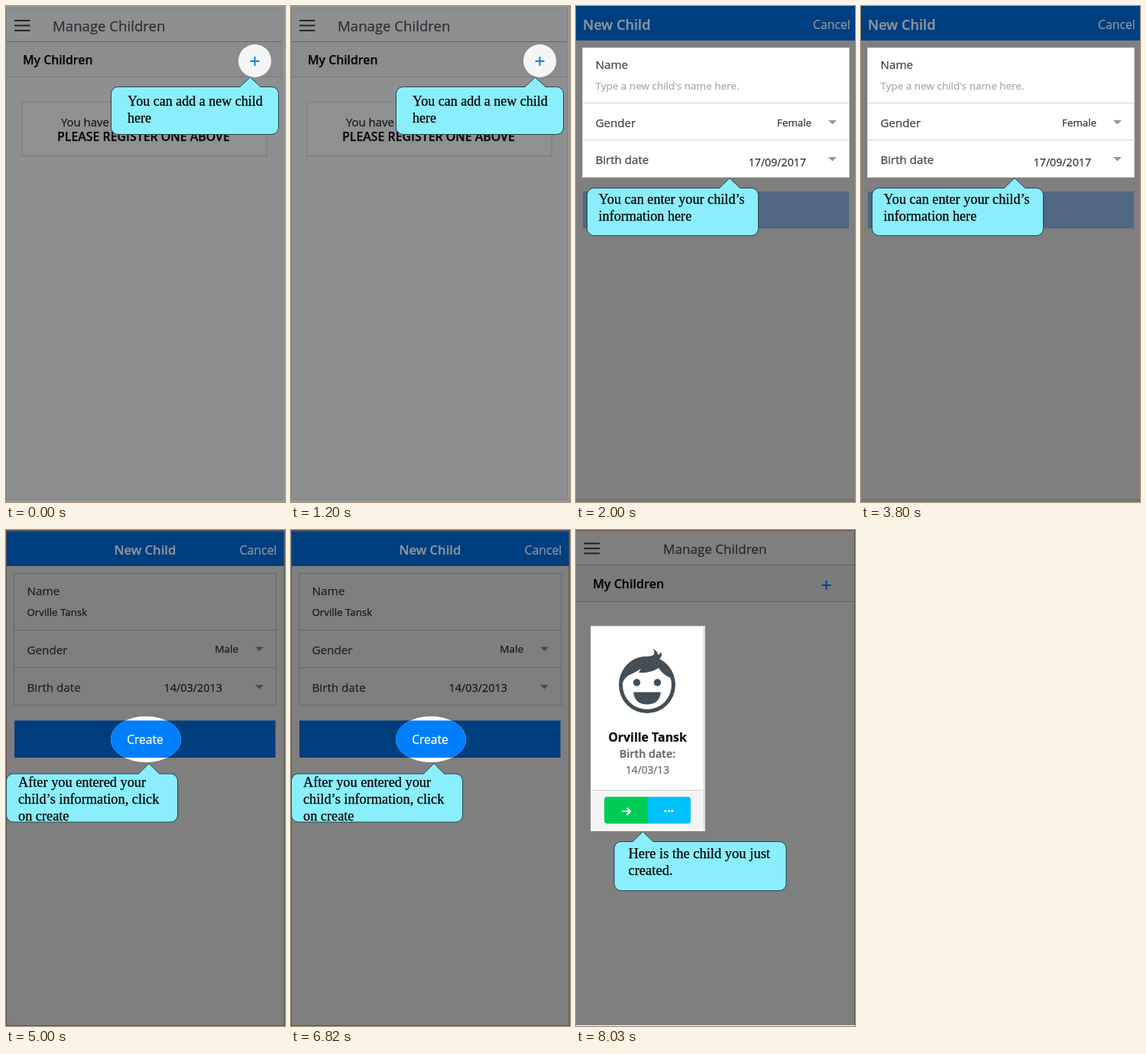
An HTML page for the animation above (10 s loop, 365 by 647 pixels).

```html
<!DOCTYPE html>
<html lang="en">
<head>
<meta charset="utf-8">
<title>Adding a child</title>
<style>
html, body { margin: 0; width: 100%; height: 100%; overflow: hidden; background: #7f7f7f; }
svg { display: block; width: 365px; height: 647px; font-family: "Open Sans", "Noto Sans", sans-serif; }
text { stroke-width: .25px; }
.tip text { font-family: "Liberation Serif", serif; }
</style>
</head>
<body>
<svg id="stage" viewBox="0 0 365 647"></svg>
<script>
const stage = document.getElementById("stage");

const rect = (x, y, w, h, fill, extra = "") =>
  `<rect x="${x}" y="${y}" width="${w}" height="${h}" fill="${fill}" ${extra}/>`;

// The thin stroke gives the letters a slightly stronger weight
const text = (x, y, size, fill, str, weight = 400, anchor = "start") =>
  `<text x="${x}" y="${y}" font-size="${size}" fill="${fill}" stroke="${fill}" font-weight="${weight}" text-anchor="${anchor}">${str}</text>`;

const path = (d, fill, stroke = "none", width = 1) =>
  `<path d="${d}" fill="${fill}" stroke="${stroke}" stroke-width="${width}"/>`;

const circle = (x, y, r, fill) => `<circle cx="${x}" cy="${y}" r="${r}" fill="${fill}"/>`;

const arrow = (x, y, fill) => path(`M${x} ${y}h11l-5.5 5.5z`, fill);
const plus = (x, y, color) => path(`M${x - 6} ${y}h12M${x} ${y - 6}v12`, "none", color, 2);
const menu = (x, y, color) => path(`M${x} ${y}h20.5m-20.5 6.5h20.5m-20.5 6.5h20.5`, "none", color, 2);

// Speech bubble whose tail points up to (tipX, tipY)
function bubble(x, y, w, h, tipX, tipY, textX, textY, size, lines) {
  const r = 9, half = 13.5, arc = (dx, dy) => `a${r} ${r} 0 0 1 ${dx} ${dy}`;
  const d = `M${x + r} ${y}H${tipX - half}L${tipX} ${tipY}L${tipX + half} ${y}H${x + w - r}` +
    `${arc(r, r)}V${y + h - r}${arc(-r, r)}H${x + r}${arc(-r, -r)}V${y + r}${arc(r, -r)}z`;
  return `<g class="tip">${path(d, "#8aeefd", "#23474d")}` +
    lines.map((s, i) => text(textX, textY + i * 22, size, "#000", s)).join("") + "</g>";
}

const NAME = "Orville Tansk";
const EDGE = "#5d4c48";

const emptyList = () =>
  rect(0, 0, 365, 647, "#949597") +
  rect(.5, 2.5, 361, 641, "#8e8f91", 'stroke="#7f8082"') +
  rect(1, 47, 360, 45, "#8b8c8e") +
  path("M0 46.5H361", "none", "#68696b") +
  path("M0 92.5H361", "none", "#7b7c7e") +
  menu(11, 19, "#27282a") +
  text(61, 33, 18.6, "#303134", "Manage Children") +
  text(22, 76, 15.8, "#080808", "My Children", 600) +
  rect(20, 125, 322, 72, "#818284", 'rx="2"') +
  rect(21, 125, 320, 70, "#8f9092", 'rx="2" stroke="#7d7e80"') +
  text(72, 157, 14.9, "#18191a", "You have") +
  text(67, 176, 15.9, "#080808", "PLEASE REGISTER ONE ABOVE", 600) +
  circle(325.5, 71.5, 21.5, "#f5f5f6") +
  plus(325.5, 72, "#0a80f5") +
  bubble(137.5, 105.5, 219, 62, 319.5, 93, 159, 130, 18, ["You can add a new child", "here"]);

const emptyForm = () =>
  rect(0, 0, 365, 647, "#7f7f7f") +
  rect(0, 0, 365, 45, "#003f80") +
  rect(0, 643, 365, 4, "#757575") +
  text(9, 31, 18.2, "#8c959e", "New Child", 600) +
  text(310, 30, 15.8, "#8c959e", "Cancel") +
  rect(8.5, 54.5, 349, 169, "#fff", 'stroke="#d0d0d0"') +
  path("M9 126.5H357M9 175H357", "none", "#dcdcdc", 1.5) +
  text(25.5, 82, 15.2, "#444", "Name") +
  text(25.5, 109, 13.5, "#aaa", "Type a new child's name here.") +
  text(25.5, 158, 15.1, "#444", "Gender") +
  text(25.5, 206, 15.1, "#444", "Birth date") +
  text(308, 157, 13.3, "#333", "Female", 400, "end") +
  text(301, 209, 14.2, "#333", "17/09/2017", 400, "end") +
  arrow(330, 149, "#999") + arrow(330, 197, "#999") +
  rect(9, 242, 348, 48, "#516683") +
  bubble(14.5, 237.5, 224, 62, 201, 224.5, 29.5, 258, 18.2, ["You can enter your child’s", "information here"]);

const filledForm = () =>
  rect(0, 0, 365, 647, "#7f7f7f") +
  rect(0, 1.5, 364, 45.5, "#003f7f") +
  rect(.5, .5, 363.5, 646, "none", `stroke="${EDGE}"`) +
  text(141.5, 32, 16.6, "#8c959e", "New Child", 600) +
  text(305.5, 32, 15.8, "#8c959e", "Cancel") +
  rect(10.5, 56.5, 343, 172, "none", 'stroke="#686868"') +
  path("M11 130.5H353M11 179.5H353", "none", "#686868") +
  text(27.5, 85, 15.3, "#222", "Name") +
  text(27.5, 112, 13.3, "#191919", NAME) +
  text(27.5, 162, 15.2, "#222", "Gender") +
  text(27.5, 211, 15.2, "#222", "Birth date") +
  text(304, 160, 13.5, "#191919", "Male", 400, "end") +
  text(283, 211, 14.4, "#191919", "14/03/2013", 400, "end") +
  arrow(326, 152.5, "#4a4a4a") + arrow(326, 202, "#4a4a4a") +
  rect(11, 248.5, 341.5, 48.5, "#003e7d") +
  '<clipPath id="spot"><ellipse cx="183" cy="273" rx="46" ry="30"/></clipPath>' +
  `<g clip-path="url(#spot)">${rect(137, 243, 92, 60, "#fff")}${rect(137, 248.5, 92, 48.5, "#007ffc")}</g>` +
  text(182, 279, 15.6, "#fff", "Create", 400, "middle") +
  bubble(.5, 318, 224, 63, 187, 304.5, 16, 335, 18.3,
    ["After you entered your", "child’s information, click", "on create"]);

const face = ink =>
  circle(93, 202, 37, ink) + circle(93, 202, 32, "#fff") +
  path("M57 199C58 180 73 165 91 165C97 165 101 164 102 162Q103 159 101 155Q107 158 107 163Q110 162 111 159Q114 164 109 168" +
    "C121 174 129 186 129 199L124 193Q114 189 108 180Q98 187 82 186L85 181Q75 187 70 189Q64 192 61 199z", ink) +
  circle(79.5, 199, 4.7, ink) + circle(106.5, 199, 4.7, ink) +
  path("M75 211.5H111Q109 227.5 93 227.5Q77 227.5 75 211.5z", ink);

const filledList = () =>
  rect(0, 0, 365, 647, "#7f7f7f") +
  rect(0, 46, 364, 47, "#7b7b7b") +
  path("M0 .5H364.5V646", "none", EDGE) +
  rect(0, 646, 365, 1, "#fff") +
  path("M0 45.5H364", "none", "#5b5b5b") +
  path("M0 93.5H364", "none", "#6b6b6b") +
  menu(10.5, 17.5, "#222") +
  text(114, 31, 17.1, "#292929", "Manage Children") +
  text(22, 76, 16.1, "#080808", "My Children", 600) +
  plus(327.5, 72, "#00458c") +
  rect(19.5, 125.5, 149, 267, "#fff", 'stroke="#e2e2e2"') +
  rect(20, 340, 147, 51, "#f4f4f4") +
  path("M20 339.5H168", "none", "#d4d4d4") +
  path("M167.5 126V392", "none", "#dedede", 2) +
  face("#434e56") +
  text(93.5, 276, 15.9, "#111", NAME, 700, "middle") +
  text(93.5, 297, 14.4, "#666", "Birth date:", 600, "middle") +
  text(93.5, 318, 13.7, "#6c6c6c", "14/03/13", 400, "middle") +
  path("M94 348H41a4 4 0 0 0-4 4v27a4 4 0 0 0 4 4h53z", "#00cc55") +
  path("M94 348h52a4 4 0 0 1 4 4v27a4 4 0 0 1-4 4h-52z", "#00c1f9") +
  path("M60 367H71M66.5 362.5L71 367L66.5 371.5", "none", "#fff", 2) +
  [117, 121.5, 126].map(x => circle(x, 366.5, 1.7, "#fff")).join("") +
  bubble(50, 406.5, 225, 64, 87.5, 393.5, 68.5, 428, 18.5, ["Here is the child you just", "created."]);

const scenes = [[0, emptyList], [2000, emptyForm], [5000, filledForm], [8030, filledList]];
stage.innerHTML = scenes.map(([, draw]) => `<g display="none">${draw()}</g>`).join("");
const groups = [...stage.children];
const start = performance.now();

function tick() {
  const t = (performance.now() - start) % 10000;
  const current = scenes.filter(([from]) => from <= t).length - 1;
  groups.forEach((g, i) => g.setAttribute("display", i === current ? "inline" : "none"));
  requestAnimationFrame(tick);
}
tick();
</script>
</body>
</html>
```
